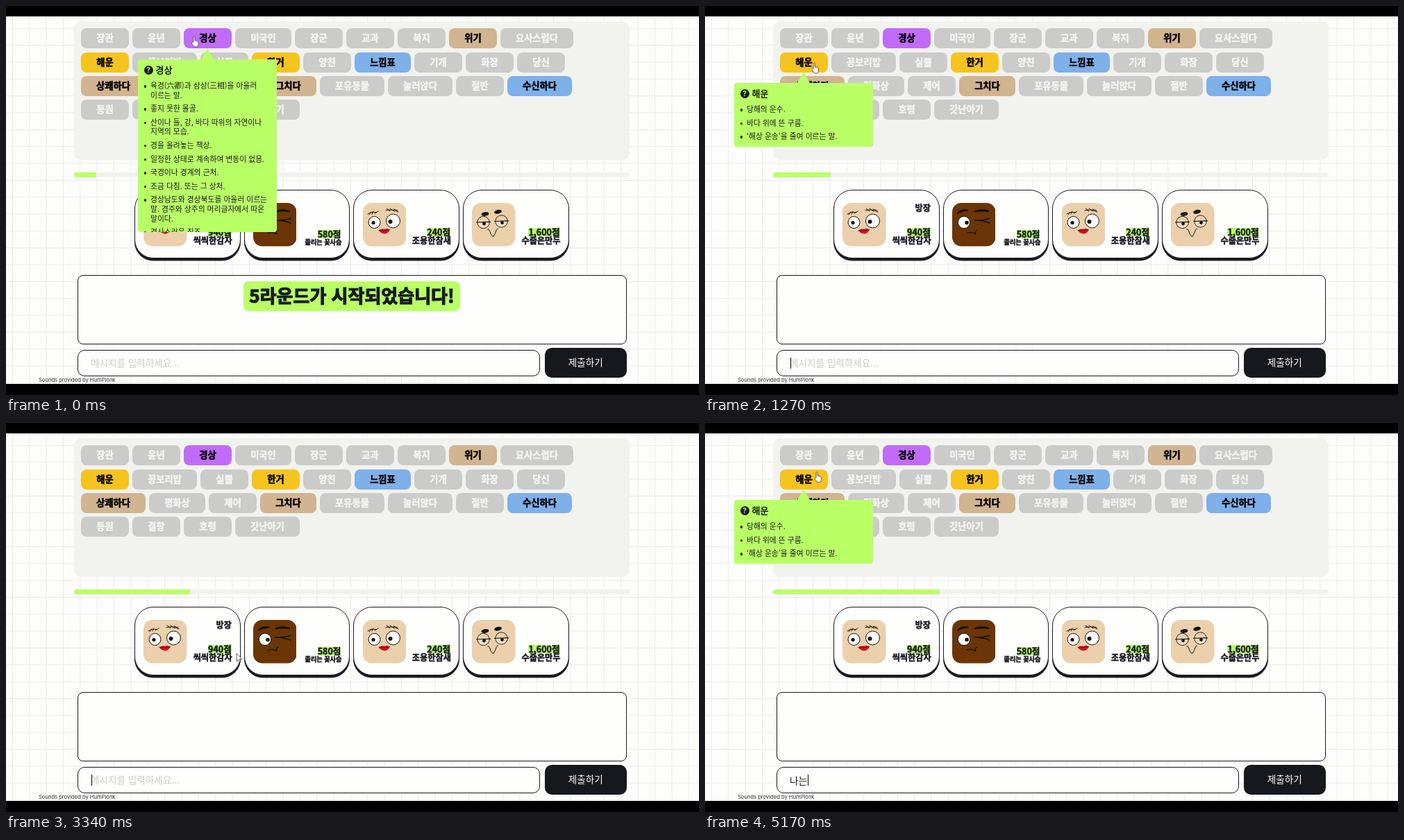
An HTML page for the animation above (5.2 s loop, 998x561 px).

```html
<!DOCTYPE html>
<html lang="ko">
<head>
<meta charset="utf-8">
<title>낱말 놀이</title>
<style>
:root { --ink: #191a23; --lime: #b9ff66; --mist: #f2f2ef; }
* { box-sizing: border-box; }
html, body { margin: 0; width: 100%; height: 100%; overflow: hidden; background: #000; }
body { font-family: "Noto Sans CJK KR", "Noto Sans CJK", "Noto Sans CJK JP", sans-serif; color: var(--ink); }
#stage { position: relative; width: 998px; height: 561px; overflow: hidden; }
#stage > * { position: absolute; }
.paper { left: 0; top: 0; width: 998px; height: 561px; background:
  linear-gradient(90deg, #ebebee 1px, transparent 1px) 9px 0 / 24.35px 24.35px,
  linear-gradient(#ebebee 1px, transparent 1px) 0 7.5px / 24.35px 24.35px, #fdfdfb; }
.band { left: 0; width: 998px; height: 16px; background: #000; z-index: 9; }

.words { left: 98px; top: 22px; width: 800px; height: 200px; border-radius: 10px; background: var(--mist); }
.row { position: absolute; left: 10px; display: flex; gap: 5px; }
/* The outline thickens bold text to a black weight. */
.chip, .card { -webkit-text-stroke: .5px currentColor; }
.chip { height: 29px; border-radius: 8px; font-size: 13.3px; font-weight: 900; line-height: 27px;
  text-align: center; white-space: nowrap; color: #f4f4f1; background: #cbccca; }
.hit { color: #000; }

.track { left: 98px; top: 239.5px; width: 800px; height: 7.5px; border-radius: 4px; overflow: hidden; background: var(--mist); }
.fill { height: 100%; background: var(--lime); animation: fill 5.2s linear infinite; }
@keyframes fill { from { width: 32px; } to { width: 241.5px; } }

.card { top: 265px; width: 152.5px; height: 99px; border: 1px solid var(--ink); border-radius: 27px;
  background: #fefefd; box-shadow: 0 3.5px 0 var(--ink); font-weight: 900; }
.card svg { position: absolute; left: 12.2px; top: 18px; width: 62.5px; height: 62.5px; }
.host { position: absolute; right: 12px; top: 18px; font-size: 12px; line-height: 14px; }
.info { position: absolute; right: 11px; bottom: 18px; display: flex; flex-direction: column; align-items: flex-end; white-space: nowrap; }
.info b { font-size: 12.5px; font-weight: 900; line-height: 12px; background: var(--lime); margin-right: 1px; }
.info span { font-size: 12.2px; line-height: 1.1; }
.info .long { font-size: 9.1px; }

.chat { left: 102.5px; top: 388px; width: 791px; height: 100px; border: 1px solid var(--ink); border-radius: 8px; background: #fefefd; }
.notice { left: 342px; top: 397px; width: 312px; height: 43px; border-radius: 8px; background: var(--lime);
  font-size: 26px; font-weight: 900; line-height: 40px; text-align: center; white-space: nowrap;
  -webkit-text-stroke: 1.2px currentColor; animation: notice 5.2s step-end infinite; }
@keyframes notice { 0% { visibility: visible; } 14.4%, 100% { visibility: hidden; } }

.entry { left: 102.5px; top: 496px; width: 666px; height: 38px; border: 1px solid var(--ink); border-radius: 10px;
  background: #fefefd; font-size: 13.6px; font-weight: 300; line-height: 34px; white-space: nowrap; }
.entry > * { position: absolute; left: 18.5px; top: 0; }
.hint { color: #cbcbcb; animation: hint 5.2s step-end infinite; }
@keyframes hint { 0% { visibility: visible; } 89.4%, 100% { visibility: hidden; } }
.typed { display: flex; align-items: center; height: 36px; }
.typed::before { content: ""; animation: type 5.2s step-end infinite; }
@keyframes type {
  0% { content: ""; } 89.4% { content: "ㄴ"; } 91.5% { content: "나"; } 94.2% { content: "난"; }
  96.2% { content: "나느"; } 98.1%, 100% { content: "나는"; }
}
.caret { width: 1px; height: 16px; margin-left: .5px; background: #000; animation: caret 5.2s step-end infinite; }
@keyframes caret {
  0%, 12.9%, 33.3%, 53.7%, 74% { opacity: 0; }
  2.7%, 23.1%, 43.5%, 63.8%, 84.2%, 100% { opacity: 1; }
}
.send { left: 776px; top: 492.5px; width: 117.5px; height: 43px; border-radius: 10px; background: #17181d;
  color: #fff; font-size: 13.6px; font-weight: 300; line-height: 41px; text-align: center; }
.credit { left: 47px; top: 535px; font: 7.6px/10px Inter, sans-serif; color: #333; white-space: nowrap; }

.tip { width: 200px; }
.tip::before { content: ""; position: absolute; left: 90px; top: -15.5px; width: 20px; height: 17px;
  background: var(--lime); clip-path: polygon(50% 0, 100% 100%, 0 100%); }
.sheet { position: relative; height: 100%; overflow: hidden; border-radius: 4px; background: var(--lime); }
.tip h4 { position: absolute; left: 25.5px; top: 6px; margin: 0; font-size: 13px; font-weight: 500; line-height: 18px;
  color: #000; -webkit-text-stroke: .3px #000; }
.tip i { position: absolute; left: 8.5px; top: 9px; width: 13px; height: 13px; border-radius: 50%; background: var(--ink);
  color: var(--lime); font: 700 10px/13px Inter, sans-serif; text-align: center; }
.tip ul { position: absolute; left: 18px; top: 31px; margin: 0; padding: 0; list-style: none;
  font-size: 10.8px; font-weight: 300; line-height: 13.6px; white-space: nowrap; }
.tip li { position: relative; margin-bottom: 6px; }
.tip li::before { content: ""; position: absolute; left: -9.5px; top: 6px; width: 3.5px; height: 3.5px; border-radius: 50%; background: var(--ink); }
.tip-a { left: 190px; top: 77px; height: 249px; animation: tip-a 5.2s step-end infinite; }
.tip-b { left: 42px; top: 111px; height: 92px; animation: tip-b 5.2s step-end infinite; }
@keyframes tip-a { 0% { visibility: visible; } 22.5%, 100% { visibility: hidden; } }
@keyframes tip-b { 0%, 44.2% { visibility: hidden; } 22.5%, 74%, 100% { visibility: visible; } }

.cursor { left: 0; top: 0; width: 12px; height: 17px; overflow: visible; animation: roam 5.2s linear infinite; }
.cursor path { fill: #fff; stroke: #333; stroke-width: .8; stroke-linejoin: round; }
.hand { animation: hand 5.2s step-end infinite; }
.arrow { animation: arrow 5.2s step-end infinite; }
@keyframes roam {
  0%, 15.4% { transform: translate(266.5px, 43.5px); }
  20.2% { transform: translate(170px, 80px); }
  21.15% { transform: translate(167.5px, 80px); }
  24.4%, 30.8% { transform: translate(153px, 81.5px); animation-timing-function: ease-in-out; }
  38.46% { transform: translate(353px, 360px); }
  52.7%, 62.9% { transform: translate(336.5px, 339px); animation-timing-function: ease-in-out; }
  75%, 100% { transform: translate(157px, 70px); }
}
@keyframes hand { 0%, 20.2%, 73%, 100% { opacity: 1; } 16.5%, 31.7% { opacity: 0; } }
@keyframes arrow { 0%, 20.2%, 73%, 100% { opacity: 0; } 16.5%, 31.7% { opacity: 1; } }
</style>
</head>
<body>
<div id="stage">
  <div class="paper"></div>
  <div class="words"></div>
  <div class="track"><div class="fill"></div></div>
  <div class="chat"></div>
  <div class="notice">5라운드가 시작되었습니다!</div>
  <div class="entry">
    <span class="hint">메시지를 입력하세요...</span>
    <span class="typed"><span class="caret"></span></span>
  </div>
  <div class="send">제출하기</div>
  <div class="credit">Sounds provided by HumPlonk</div>
  <div class="band" style="top:-1px"></div>
  <div class="band" style="top:545px"></div>
</div>
<script>
const stage = document.getElementById('stage');
const add = (html, parent = stage) => parent.insertAdjacentHTML('beforeend', html);

// Word chips: a trailing letter picks the colour.
const tints = { p: '#c16cf8', t: '#d1b490', y: '#f6c41f', b: '#7eb0e9' };
const chip = word => {
  const [, text, tint] = word.match(/^(.*?)([ptyb]?)$/);
  const look = tint ? `;background:${tints[tint]}` : '';
  return `<div class="chip${tint ? ' hit' : ''}" style="width:${45 + 12 * text.length}px${look}">${text}</div>`;
};
[
  '장관 윤년 경상p 미국인 장군 교과 복지 위기t 요사스럽다',
  '해운y 꽁보리밥 실뿔 한거y 양친 느낌표b 기개 화장 당신',
  '상쾌하다t 평화상 제어 그치다t 포유동물 눌러앉다 절반 수신하다b',
  '동원 결항 호령 갓난아기'
].forEach((line, i) => add(
  `<div class="row" style="top:${10.3 + 34.2 * i}px">${line.split(' ').map(chip).join('')}</div>`,
  stage.querySelector('.words')));

// Faces on a 62.5 unit square.
const dot = (x, y, r, fill = '#111') => `<circle cx="${x}" cy="${y}" r="${r}" fill="${fill}"/>`;
const line = (d, w = 1, fill = 'none') =>
  `<path d="${d}" fill="${fill}" stroke="#111" stroke-width="${w}" stroke-linecap="round"/>`;
const eye = (x, y, r, px, py, pr) =>
  `<circle cx="${x}" cy="${y}" r="${r}" fill="#fff" stroke="#111"/>` + dot(px, py, pr);
const lidded = (x, y) =>
  `<path d="M${x - 9} ${y}a9 9 0 0 0 18 0z" fill="#f3dfc4"/>` +
  `<circle cx="${x}" cy="${y}" r="8.7" fill="none" stroke="#111" stroke-width=".9"/>` +
  line(`M${x - 10} ${y}L${x + 10} ${y - .6}`, 1.2) + dot(x + 1, y + 2, 2.4);

const lips =
  line('M7 16Q12 12 19 14M9 17L12 13M13 16L15 12M17 15L22 12') +
  line('M33 11Q41 8 51 13M34 8L39 12M39 8L45 12M44 9L50 11') +
  eye(16.5, 28, 8.5, 15, 28.5, 2.6) + eye(43.5, 26, 10, 39.5, 27, 3) +
  '<path d="M22.5 39.5Q26 37 29.5 37.5Q32 38.5 34 36.8Q36 37.5 39 38.5Q36 44.5 31 44.5Q26 44 22.5 39.5z" fill="#d3121f"/>' +
  line('M23 39.7Q30 41 38.5 38.7', .6);
const wink =
  line('M7.5 15Q13 8.5 23 10.5Q14 11 7.5 15z', 1.8, '#111') +
  line('M32 12.5Q42 8 53 12Q42 10.8 32 12.5z', 1.8, '#111') +
  eye(17, 28, 8.7, 21, 28.5, 2.8) +
  line('M32 25Q43 26 54 22.5M32 25Q43 25 54 29', 1.4) +
  line('M21 43.5Q28 41.5 34 44.5M33 45Q33 40 36 39', 1.2);
const smirk =
  '<ellipse cx="19" cy="16" rx="5.5" ry="2.8" transform="rotate(-8 19 16)" fill="#111"/>' +
  '<ellipse cx="37.5" cy="12.8" rx="5.5" ry="2.8" transform="rotate(-12 37.5 12.8)" fill="#111"/>' +
  lidded(16.5, 28) + lidded(42.5, 26.5) +
  line('M22.5 38Q24 37 25 39Q27 46 30.5 49Q34 44 35.5 38.5Q36 37 37.5 37.5');

const skin = '#ecd0ab';
[
  ['940점', '씩씩한감자', lips, skin],
  ['580점', '졸리는 꽃사슴', wink, '#6b3505'],
  ['240점', '조용한참새', lips, skin],
  ['1,600점', '수줍은만두', smirk, skin]
].forEach(([score, name, face, tone], i) => add(
  `<div class="card" style="left:${185.2 + 157.6 * i}px">
    <svg viewBox="0 0 62.5 62.5"><rect width="62.5" height="62.5" rx="13" fill="${tone}"/>${face}</svg>
    ${i ? '' : '<div class="host">방장</div>'}
    <div class="info"><b>${score}</b><span class="${name.length > 5 ? 'long' : ''}">${name}</span></div>
  </div>`));

const tip = (id, title, items) => add(
  `<div class="tip tip-${id}"><div class="sheet"><i>?</i><h4>${title}</h4>
  <ul>${items.map(item => `<li>${item}</li>`).join('')}</ul></div></div>`);
tip('a', '경상', [
  '육경(六卿)과 삼상(三相)을 아울러<br>이르는 말.',
  '좋지 못한 몰골.',
  '산이나 들, 강, 바다 따위의 자연이나<br>지역의 모습.',
  '경을 올려놓는 책상.',
  '일정한 상태로 계속하여 변동이 없음.',
  '국경이나 경계의 근처.',
  '조금 다침. 또는 그 상처.',
  '경상남도와 경상북도를 아울러 이르는<br>말. 경주와 상주의 머리글자에서 따온<br>말이다.',
  '경사스러운 징조.'
]);
tip('b', '해운', ['당해의 운수.', '바다 위에 뜬 구름.', '‘해상 운송’을 줄여 이르는 말.']);

add(`<svg class="cursor">
  <path class="hand" d="M3.2 8.6V1.8a1.1 1.1 0 0 1 2.2 0V6.2l3.6.8q1.4.3 1.4 1.6v2.8q0 2-1.2 3.8H4.4L1 10.6q-.5-1.3.6-1.7z"/>
  <path class="arrow" d="M0 0V11.5L2.7 9 4.3 12.8 6 12 4.4 8.4H8z"/>
</svg>`);
</script>
</body>
</html>
```
